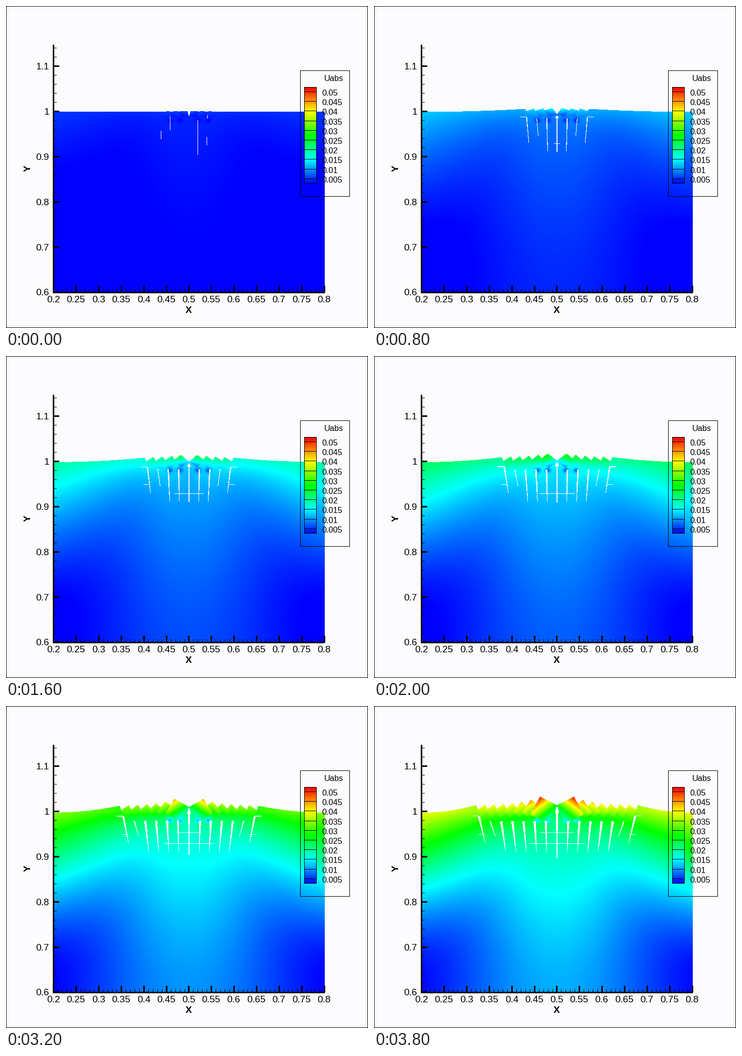
Recreate the animation shown at these times as a matplotlib script. Size 720 px wide and 640 px high, loop 4000 ms.

```python
import numpy as np
import matplotlib.pyplot as plt
from matplotlib.animation import FuncAnimation
from matplotlib.patches import Rectangle

W, H, DPI = 720, 640, 100
FRAMES = 20
LEFT, MID, RIGHT, TOP, BOTTOM = 94, 364, 634, 170, 570
SCALE = 898.3                      # pixels per unit length
BLOCK = 18.1                       # width of one surface block
BG = "#fcfcfe"
FONT = "Liberation Sans"

# Hairlines in the unloaded state: x, top, bottom
HAIRLINES = [(308, 248, 265), (326, 220, 247), (381, 226, 296),
             (400, 217, 224), (399, 260, 277)]

# Left half only; the right half is its mirror image
X, Y = np.meshgrid(np.arange(LEFT, MID) + .5, np.arange(TOP, BOTTOM) + .5)
DX = (MID - X) / SCALE
DEPTH = np.clip((Y - 209.5) / SCALE, 0, .43)


def rainbow(s):
    stops = [0, .25, .5, .75, 1]
    return np.stack([np.interp(s, stops, c) for c in
                     ([0, 0, 0, 1, 1], [0, 1, 1, 1, 0], [1, 1, 0, 0, 0])], -1)


def displacement(bend, lift):
    """Outward bending combined with a rising bump in the middle."""
    spread = (DX / .3) ** (.7 - .45 * np.exp(-DEPTH / .05))
    ux = .8 * bend * spread * (1 - DEPTH / .43) ** 1.9
    rise = .22 + .2 * np.clip(1 - DEPTH / .4, 0, 1) ** 1.5
    uy = lift * rise * np.exp(-(DX / (.13 + .33 * DEPTH)) ** 2)
    u = np.hypot(ux, uy)
    for off in (18, 38):
        r2 = ((X - MID + off) / 6) ** 2 + ((Y - 227) / 5) ** 2
        u = u * (1 - .5 * np.exp(-r2))
    return u


def slit(x0, y0, x1, y1, w0, w1):
    """Tapered, nearly vertical opening."""
    f = (Y - y0) / (y1 - y0)
    half = np.maximum(w0 + (w1 - w0) * f, 1.05) / 2
    return (f >= 0) & (f <= 1) & (np.abs(X - x0 - (x1 - x0) * f) <= half)


def bar(x0, x1, y):
    return (X >= x0) & (X <= x1) & (np.abs(Y - y - .5) < .6)


def crack_count(n):
    return 3 + int(max(0, .29 * n - .89))


def surface(p, m, u):
    """Solid mask and values of the body with its row of tilted blocks."""
    peak_x, peak_y = 361 - 31 * p, 208.5 - 28.5 * p
    notch = 219.5 - 22.5 * p
    edge = 209.5 - 12.5 * p ** .6
    tilt = 1 + 35 * p ** 1.4
    low = min(tilt, 8)
    bend = .13 + .87 * p

    blocks = []
    for k in reversed(range(m)):
        e = np.exp(-k / 2.2)
        corner = peak_x - BLOCK * k, edge + (peak_y - edge) * e
        inner = 5 + (MID - peak_x - 5) * e, 15 + (notch - peak_y - 15) * e
        face = -15 - 4 * e * p ** 2, low + (tilt - low) * e
        blocks.append((corner, inner, face, e))

    # Smooth rise to the first crack, then the feet of the blocks
    edge_x = peak_x - BLOCK * m
    px = [edge_x] + [c[0] + f[0] for c, _, f, _ in blocks] + [MID]
    py = [edge] + [c[1] + f[1] for c, _, f, _ in blocks] + [notch]
    base = 210 + 2 * p
    slope = base - (base - edge) * ((X - LEFT) / (edge_x - LEFT)) ** 2
    solid = Y >= np.where(X < edge_x, slope, np.interp(X, px, py))

    # Inner blocks lie in front
    for (cx, cy), (ix, iy), (fx, fy), e in blocks:
        det = ix * fy - iy * fx
        a = ((X - cx) * fy - (Y - cy) * fx) / det
        b = ((Y - cy) * ix - (X - cx) * iy) / det
        block = (a >= 0) & (a <= 1) & (b >= 0) & (b <= 1)
        top = .8 * bend * (1 + .3 * e ** 1.5)
        shade = top * (1 - (.12 + .35 * e) * a - (.05 + .2 * e) * b)
        u = np.where(block, shade, u)
        solid |= block
    return solid, u


def openings(p, m):
    """Cracks, their cross bars and the arrow-shaped gap in the middle."""
    gap = .6 + 4.4 * p ** .7
    head = 222 + 7 * p
    void = np.zeros(X.shape, bool)
    for k in range(1, m + 1):
        y0 = head - 10 * p * (k == m)
        y1 = 289 - 17 * (k == m) - 30 * (k == m - 1)
        x0, x1 = MID - k * (19.6 + 2.6 * p), MID - k * (18.2 + 2.2 * p)
        void |= slit(x0, y0, x1, y1, gap * min(1, (y1 - y0) / 60), .8)
    void |= bar(x0 - 13, x0, y0 - 1)
    void |= bar(x1 - 14, x1 - 1, 255) & (p > .25)

    void |= bar(MID - 62 * max(0, p - .2) ** .5, MID, 273)
    void |= bar(MID - 73 * max(0, p - .55), MID, 251)

    tip = 222 - 21 * p
    void |= slit(MID, tip, MID, tip + 4 + 7 * p, 1, 9)
    void |= slit(MID, tip, MID, 290 + 12 * p ** 4, gap - .8, 1.6)
    return void


def strip(n):
    p = n / (FRAMES - 1)
    m = crack_count(n)
    solid, u = surface(p, m, displacement(.13 + .87 * p, .2 + .8 * p ** .9))
    if n:
        solid &= ~openings(p, m)
    half = np.dstack([rainbow(u - .05), solid])
    img = np.concatenate([half, half[:, ::-1]], axis=1)
    if n == 0:
        for x, y0, y1 in HAIRLINES:
            img[y0 - TOP:y1 - TOP, x - LEFT, 3] = 0
    return img


fig = plt.figure(figsize=(W / DPI, H / DPI), dpi=DPI, facecolor=BG)
ax = fig.add_axes([0, 0, 1, 1])
ax.axis("off")


def box(x, y, w, h):
    ax.add_patch(Rectangle((x, y), w, h, fc="black", lw=0,
                           antialiased=False, zorder=3))


def frame(x0, y0, x1, y1):
    for y in (y0, y1):
        box(x0, y, x1 - x0 + 1, 1)
    for x in (x0, x1):
        box(x, y0, 1, y1 - y0 + 1)


def label(x, y, s, px=19, **kw):
    ax.text(x, y, s, fontsize=px * 72 / DPI, family=FONT, va="baseline",
            zorder=4, **kw)


field = ax.imshow(strip(0), extent=(LEFT, RIGHT, BOTTOM, TOP),
                  interpolation="nearest", zorder=1)
ramp = rainbow(np.linspace(1, 0, 192))[:, None, :]
ax.imshow(ramp, extent=(593, 618, 353, 161), interpolation="nearest", zorder=2)
ax.set_xlim(0, W)
ax.set_ylim(H, 0)
ax.set_aspect("auto")

frame(0, 0, W - 1, H - 1)

# Axes with ticks
box(93, 77, 3, 494)
box(93, 568, 541, 3)
for i in range(61):
    x = round(94 + i * 8.983)
    if i % 5 == 0:
        box(x - 1, 556, 3, 13)
        label(x, 589, f"{.2 + i / 100:g}", ha="center")
    else:
        box(x, 563, 1, 6)
for i in range(28):
    y = round(568.5 - i * 17.97)
    if i % 5 == 0:
        box(94, y - 1, 12, 3)
        label(86, y + 7, f"{.6 + i / 50:g}", ha="right")
    else:
        box(94, y, 7, 1)
label(363, 610, "X", ha="center", weight="bold")
label(49, 323, "Y", ha="center", weight="bold", rotation=90,
      rotation_mode="anchor")

# Legend
frame(585, 128, 683, 378)
frame(593, 161, 617, 352)
label(652, 149, "Uabs", 16.4, ha="center")
for i in range(10):
    y = 170 + 19.2 * i
    box(593, round(y), 25, 1)
    label(628.5, y + 8, f"{.05 - .005 * i:.3g}", 16.3)


def update(n):
    field.set_data(strip(n))
    return field,


anim = FuncAnimation(fig, update, frames=FRAMES, interval=200, repeat=True,
                     repeat_delay=0, blit=False)
plt.show()
```
